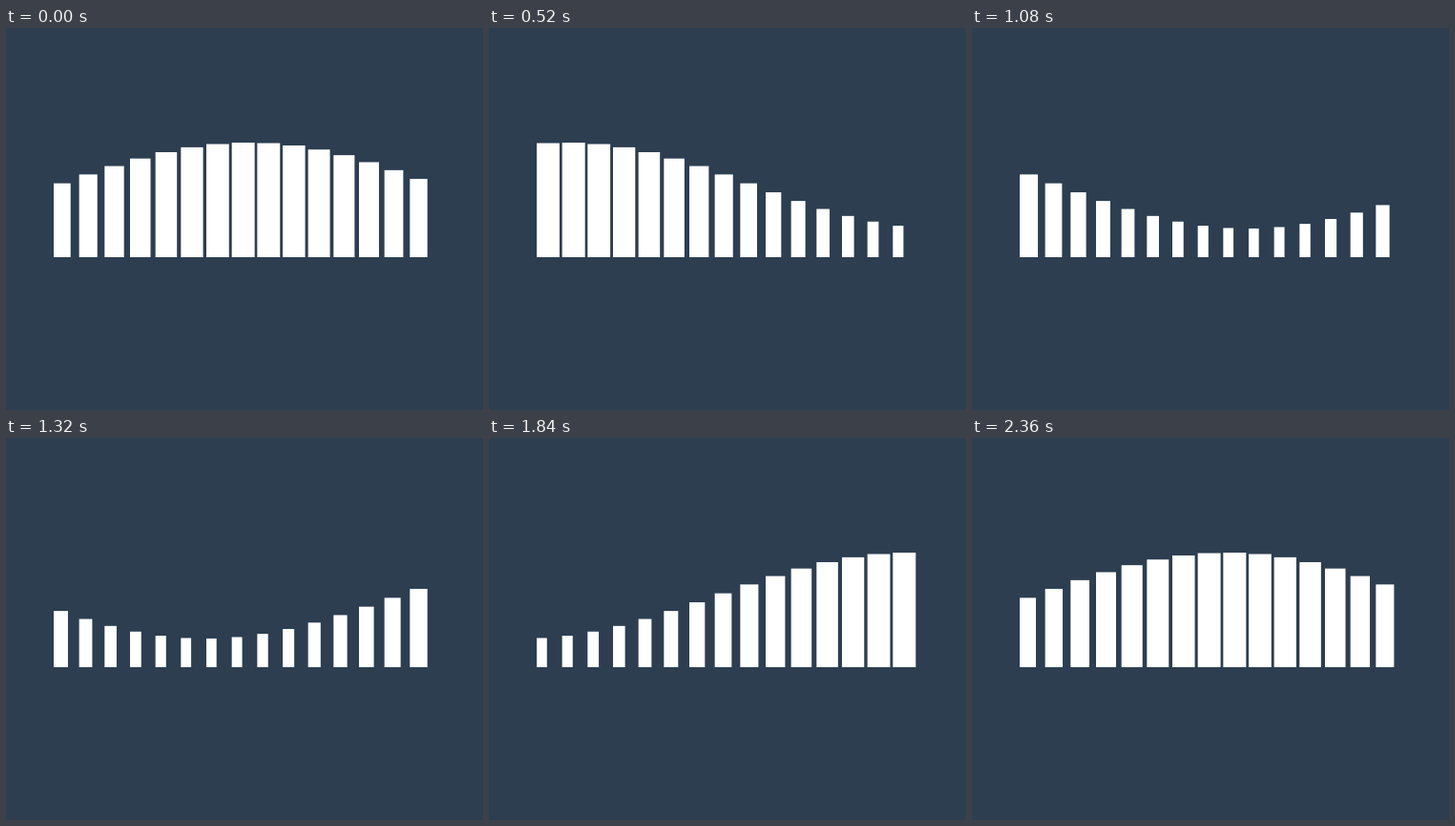
Animation, 500 px wide and 400 px high, one loop 2.4 s. Source, as an HTML page with a canvas:

```html
<!DOCTYPE html>
<html lang="en">
<head>
<meta charset="utf-8">
<title>Wave of bars</title>
<style>
  html, body { margin: 0; width: 100%; height: 100%; overflow: hidden; background: #2c3e50; }
  canvas { display: block; }
</style>
</head>
<body>
<canvas id="stage" width="500" height="400"></canvas>
<script>
const ctx = document.getElementById('stage').getContext('2d');
const LOOP = 2400, STEP = 40;
const BARS = 15, LEFT = 50, BASE = 240, PITCH = 400 / BARS;

const mix = (from, to, k) => from + (to - from) * k;

function draw(now) {
  // Hold each pose for one step, sampled at its middle.
  const time = Math.floor((now + 1) / STEP) * STEP + STEP / 2;
  const phase = (time % LOOP) / LOOP * 2 * Math.PI;

  ctx.fillStyle = '#2c3e50';
  ctx.fillRect(0, 0, 500, 400);

  ctx.fillStyle = '#fff';
  for (let i = 0; i < BARS; i++) {
    const level = (1 + Math.sin(phase + i * Math.PI / BARS)) / 2;
    const height = mix(30, 120, level);
    ctx.fillRect(LEFT + i * PITCH, BASE - height, PITCH * mix(0.4, 0.9, level), height);
  }
}

function tick() {
  draw(performance.now());
  requestAnimationFrame(tick);
}
tick();
</script>
</body>
</html>
```
